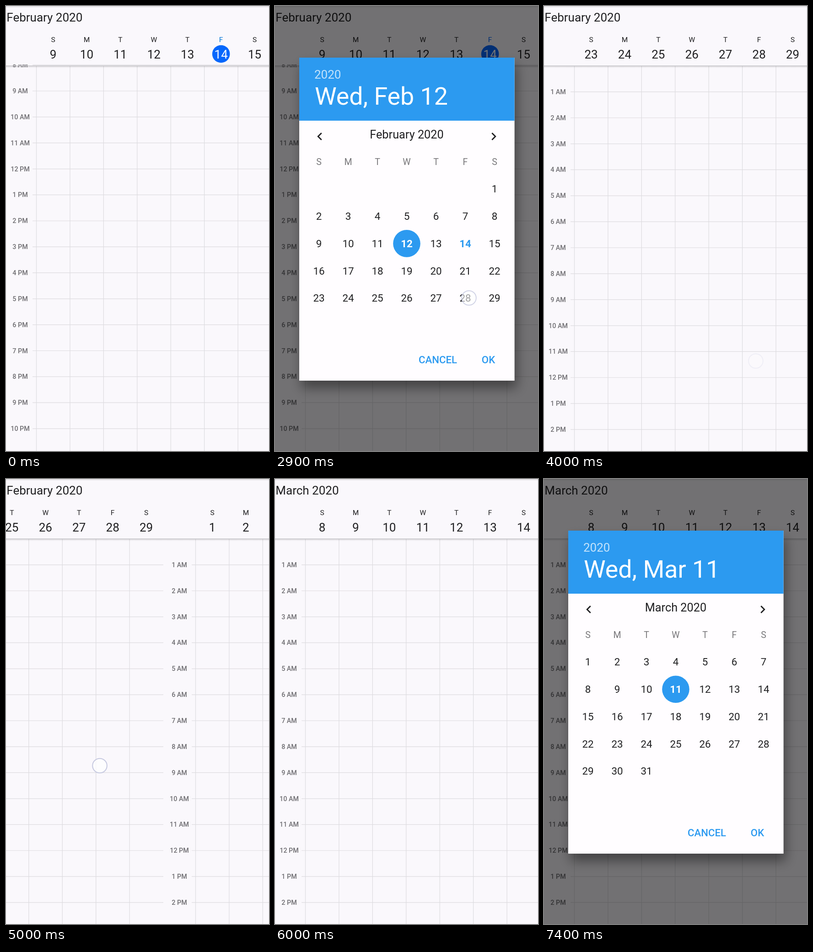
Animation of 575x974 px, one loop 8 s. Source, as an HTML page:

```html
<!DOCTYPE html>
<html lang="en">
<head>
<meta charset="utf-8">
<title>Week calendar</title>
<style>
  html, body { margin: 0; width: 100%; height: 100%; overflow: hidden; background: #faf8fc; }
  svg { display: block; width: 100%; height: 100%; font-family: Roboto, sans-serif; }
</style>
</head>
<body>
<svg viewBox="0 0 575 974">
  <defs>
    <clipPath id="grid"><rect y="128" width="575" height="846"/></clipPath>
    <linearGradient id="fade" x2="0" y2="1">
      <stop stop-color="#000" stop-opacity=".12"/>
      <stop offset="1" stop-color="#000" stop-opacity="0"/>
    </linearGradient>
    <filter id="shadow" x="-20%" y="-20%" width="140%" height="140%">
      <feDropShadow dx="5" dy="16" stdDeviation="13" flood-color="#000" flood-opacity=".42"/>
    </filter>
  </defs>
  <g id="stage"></g>
</svg>
<script>
const LOOP = 8000, STEP = 100;
const HOUR = 56.85, COL = 73.43, PAGE = 585;
const BLUE = '#2c9af0', INK = '#202022';
const DAYS = [...'SMTWTFS'];
const stage = document.getElementById('stage');

const FEB = { name: 'February', short: 'Feb', first: 6, length: 29, today: 14 };
const MAR = { name: 'March', short: 'Mar', first: 0, length: 31 };

const text = (x, y, size, str, fill = INK, weight = 400, anchor = 'middle') =>
  `<text x="${x}" y="${y}" font-size="${size}" fill="${fill}" font-weight="${weight}" text-anchor="${anchor}">${str}</text>`;

const rect = (x, y, w, h, fill, extra = '') =>
  `<rect x="${x}" y="${y}" width="${w}" height="${h}" fill="${fill}" ${extra}/>`;

// Piecewise linear value over [time, value] points.
function track(t, points) {
  if (t <= points[0][0]) return points[0][1];
  for (let i = 1; i < points.length; i++) {
    const [a, from] = points[i - 1], [b, to] = points[i];
    if (t <= b) return from + (to - from) * (t - a) / (b - a);
  }
  return points[points.length - 1][1];
}

function weekHead(first, x, today, mix) {
  return DAYS.map((d, i) => {
    const cx = x + 103 + i * COL, n = first + i, on = n === today;
    const hue = `rgb(0,${Math.round(118 - 16 * mix)},${Math.round(214 + 30 * mix)})`;
    return (on ? `<circle cx="${cx}" cy="105" r="19.3" fill="#0467fc"/>` : '') +
      text(cx, 78.6, 15.5, d, on ? hue : INK) +
      text(cx, 114.6, 26, n, on ? '#fff' : INK);
  }).join('');
}

function weekGrid(x, top) {
  let lines = '', labels = '';
  for (let h = 1; h < 24; h++) {
    const y = top + (h - 1) * HOUR;
    if (y < 110 || y > 990) continue;
    lines += `M${x + 58} ${y}H${x + 581}`;
    labels += text(x + 31, y + 5, 14.3, `${h % 12 || 12} ${h < 12 ? 'AM' : 'PM'}`, '#6e6d71', 500);
  }
  for (let i = 0; i < 7; i++) lines += `M${x + 66.5 + i * COL} 131V974`;
  return `<path d="${lines}" stroke="#dddce0" stroke-width="1.2" fill="none"/>` + labels;
}

function calendar(title, pages, top, today, mix) {
  return rect(0, 0, 575, 974, '#faf8fc') +
    `<g clip-path="url(#grid)">${pages.map(p => weekGrid(p.x, top)).join('')}</g>` +
    pages.map(p => weekHead(p.first, p.x, today, mix)).join('') +
    text(1.3, 34, 26, title, INK, 400, 'start') +
    rect(0, 0, 575, 4, 'url(#fade)') +
    rect(0, 130.3, 575, 1.5, '#c6c5c9') +
    rect(0, 131.8, 575, 4, 'url(#fade)');
}

function picker(month, picked, show) {
  if (show <= 0) return '';
  const title = `${DAY_NAMES[(month.first + picked - 1) % 7]}, ${month.short} ${picked}`;
  let out = rect(53, 113, 470.6, 707, '#fffdff', 'filter="url(#shadow)"') +
    rect(53, 113, 470.6, 138, BLUE) +
    text(86, 159, 26, 2020, 'rgba(255,255,255,.72)', 400, 'start') +
    text(87, 216, 53.7, title, '#fff', 400, 'start') +
    text(288, 289.6, 25.3, `${month.name} 2020`) +
    `<path d="M101.7 278l-7.5 7.5 7.5 7.5M474.3 278l7.5 7.5-7.5 7.5" fill="none" stroke="${INK}" stroke-width="2.8"/>`;
  DAYS.forEach((d, i) => out += text(96 + i * 64, 347.8, 19.6, d, '#79787b'));
  for (let n = 1; n <= month.length; n++) {
    const cell = month.first + n - 1;
    const x = 96 + cell % 7 * 64, y = 400.5 + Math.floor(cell / 7) * 59.7;
    const on = n === picked, now = n === month.today;
    if (on) out += `<circle cx="${x}" cy="${y}" r="29.8" fill="${BLUE}"/>`;
    out += text(x, y + 7.9, 22.4, n, on ? '#fff' : now ? BLUE : INK, on || now ? 700 : 400);
  }
  out += text(356, 782, 22.2, 'CANCEL', BLUE, 500) + text(466.5, 782, 22.2, 'OK', BLUE, 500);
  const scale = 1 - 0.1 * (1 - show) ** 3;
  return rect(0, 0, 575, 974, '#000', `opacity="${0.54 * show}"`) +
    `<g opacity="${show}" transform="translate(288 487) scale(${scale}) translate(-288 -487)">${out}</g>`;
}
const DAY_NAMES = ['Sun', 'Mon', 'Tue', 'Wed', 'Thu', 'Fri', 'Sat'];

const touch = (x, y, alpha) => alpha <= 0 ? '' :
  `<circle cx="${x}" cy="${y}" r="15.8" fill="#fff" fill-opacity=".72" stroke="#c6c9e0" stroke-width="2" opacity="${alpha}"/>`;

function touches(t) {
  if (t < 2900) return '';
  if (t < 3400) return touch(424, 639, track(t, [[2900, .8], [3000, 1], [3100, .9], [3300, 0]]));
  if (t < 4700) return touch(463, 777, track(t, [[3400, 0], [3600, 1], [3700, .9], [4000, .2]]));
  if (t < 5500) return touch(
    track(t, [[4700, 446], [4800, 422], [4900, 327], [5000, 205], [5100, 110], [5200, 90]]), 627.5,
    track(t, [[4600, 0], [4800, 1], [5000, 1], [5300, 0]]));
  return touch(
    track(t, [[5600, 440], [5700, 270], [5800, 120], [5900, 95]]), 627.5,
    track(t, [[5500, 0], [5600, .8], [5700, 1], [5900, .3], [6000, 0]]));
}

function draw(t) {
  const early = t < 3800;
  const slide1 = track(t, [[4700, 0], [4800, -20], [4900, -115], [5000, -237], [5100, -430], [5200, -540], [5300, -577], [5400, -PAGE]]);
  const slide2 = track(t, [[5500, 0], [5600, -10], [5700, -175], [5800, -410], [5900, -555], [6000, -PAGE]]);
  const shift = slide1 + slide2;
  const pages = (early ? [9] : [23, 1, 8])
    .map((first, i) => ({ first, x: shift + i * PAGE }))
    .filter(p => p.x > -PAGE && p.x < 575);
  const month = t < 5400 ? FEB : MAR;
  const picked = t >= 5400 ? 11 : t < 3000 ? 12 : 28;
  const show = track(t, [[800, 0], [900, .3], [1000, .65], [1100, .92], [1200, 1],
    [3700, 1], [3800, .7], [3900, .25], [4000, 0], [7200, 0], [7300, .6], [7400, 1]]);
  const mix = track(t, [[100, 0], [700, 1]]);
  stage.innerHTML =
    calendar(`${month.name} 2020`, pages, early ? 186 - 8 * HOUR : 187.9, early ? 14 : 0, mix) +
    picker(month, picked, show) + touches(t);
}

let last = -1;
const start = performance.now();
function tick() {
  const t = (performance.now() - start) % LOOP;
  const now = Math.floor(t / STEP) * STEP;
  if (now !== last) draw(last = now);
  requestAnimationFrame(tick);
}
tick();
</script>
</body>
</html>
```
